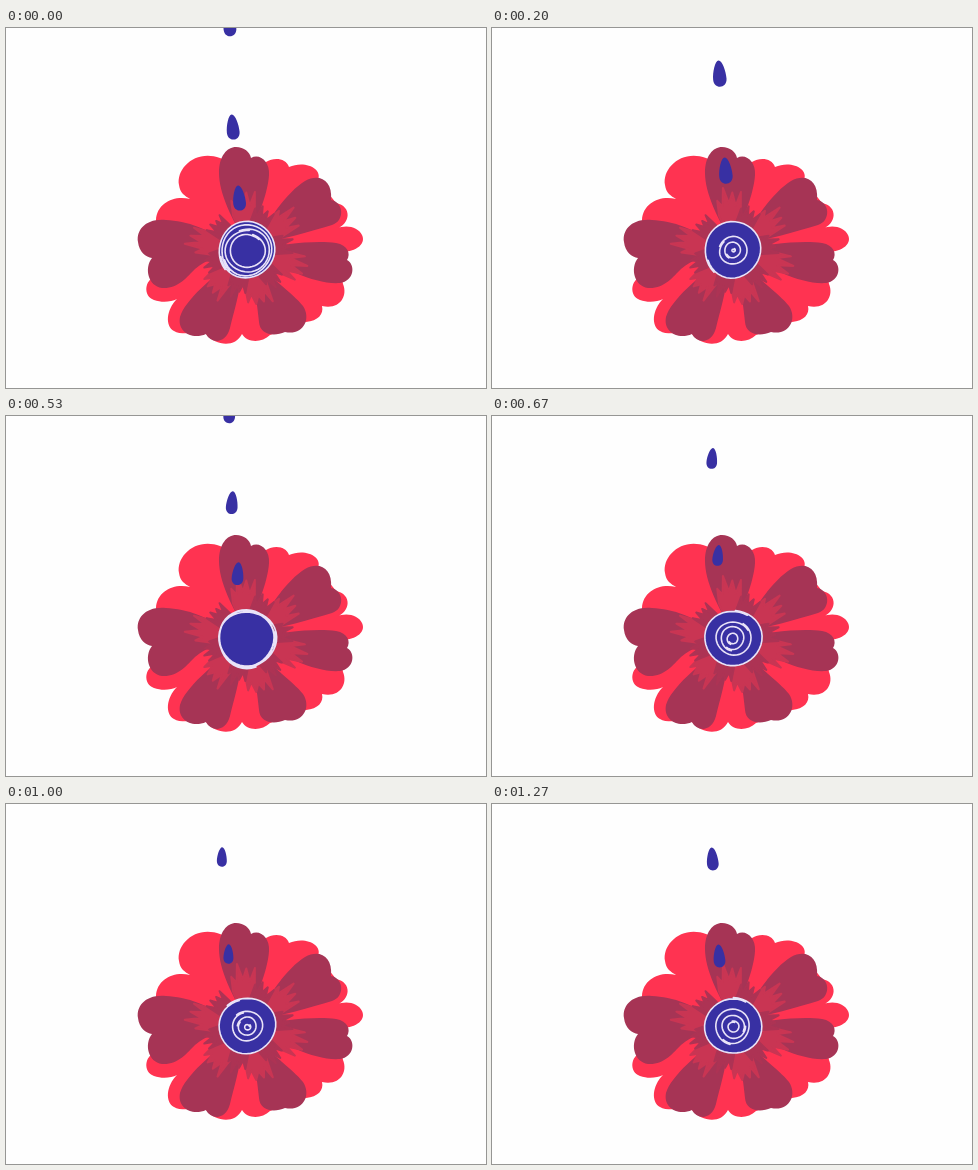
These frames come from a looping animation (480x360 px, 1.34 s). An HTML page:

```html
<!DOCTYPE html>
<html lang="en">
<head>
<meta charset="utf-8">
<title>Flower and drops</title>
<style>
  html, body { margin: 0; width: 100%; height: 100%; overflow: hidden; background: #fefefe; }
  svg { display: block; width: 100vw; height: 100vh; }
  .light { fill: #ff3351; }
  .dark { fill: #a63455; }
  #fans { stroke-width: 2; stroke-linejoin: round; }
  .ink { fill: #3830a3; }
  #rings { fill: none; stroke: #e9e3f8; stroke-width: 1.6; stroke-linecap: round; }
</style>
</head>
<body>
<svg viewBox="0 0 480 360">
  <path class="light" d="M214 130C190 121 170 140 173 157C174 165 179 168 184 171C168 167 151 175 150 192L150 248
    C138 252 137 268 148 272C156 275 165 274 171 271C160 282 159 298 168 303C174 307 184 304 200 306
    C210 318 229 320 236 306C241 315 256 315 264 307L300 294C312 293 318 286 316 278C334 282 342 268 337 256L330 224
    C352 225 360 215 356 207C352 199 340 196 330 201C345 196 346 178 330 175L312 152
    C317 140 298 132 283 139C280 130 268 129 260 134L240 140Z"/>
  <g class="dark">
    <path d="M240 214C226 192 213 165 213 145C213 128 221 119 230 119C238 119 244 124 245 130C254 125 264 134 263 147C262 166 250 195 240 214Z"/>
    <path d="M248 217C262 192 281 164 299 153C313 145 327 152 325 172C338 174 339 193 326 197C305 203 275 212 248 217Z"/>
    <path d="M250 222C275 216 310 212 330 215C342 217 345 226 341 232C350 237 348 253 334 255C310 257 275 240 250 222Z"/>
    <path d="M246 228C258 245 288 266 297 278C306 292 296 308 279 304C268 309 254 307 253 294C250 265 246 245 246 228Z"/>
    <path d="M232 230C208 247 178 273 174 289C171 304 186 312 200 306C205 316 220 316 224 300C229 280 238 250 236 232Z"/>
    <path d="M225 221C205 200 180 193 160 192C140 190 130 202 132 214C133 224 140 229 146 230C138 240 142 258 156 260C172 261 181 249 189 241C200 232 212 228 225 224Z"/>
  </g>
  <g id="fans"></g>
  <path id="core" class="ink"/>
  <g id="drops" class="ink"></g>
  <path id="rings"/>
</svg>
<script>
const CX = 241, CY = 222, HOLD = 134, POSES = 10, TAU = Math.PI * 2;
const $ = id => document.getElementById(id);
const rand = n => { const v = Math.sin(n * 12.9898 + 4.1) * 43758.5453; return v - Math.floor(v); };
const wave = (pose, peak) => Math.cos((pose - peak) / POSES * TAU);

function add(parent, d, color) {
  const p = document.createElementNS('http://www.w3.org/2000/svg', 'path');
  p.setAttribute('d', d);
  if (color) {
    p.setAttribute('fill', color);
    p.setAttribute('stroke', color);
  }
  parent.append(p);
  return p;
}

// Brush streaks spreading from the middle.
function fan(angle, reach, color, seed) {
  const n = 8;
  let d = `M${CX} ${CY}`;
  for (let i = 0; i <= n; i++) {
    const u = i / n * 2 - 1;
    const a = (angle + u * 17) / 360 * TAU;
    const r = reach * (1 - 0.2 * u * u) * (i % 2 ? 0.9 + 0.2 * rand(seed + i) : 0.78);
    d += `L${CX + r * Math.cos(a)} ${CY + r * Math.sin(a)}`;
  }
  add($('fans'), d + 'Z', color);
}
for (let i = 0; i < 6; i++) fan(i * 57 - 95, 60, '#c93553', i * 31);
for (let i = 0; i < 6; i++) fan(i * 57 - 66, 47, '#ad3354', 400 + i * 17);

// A drop enters on every even pose and falls through these heights.
const FALL = [-4, 47, 95, 144, 166];
const DROP = 'M0-13C3.5-13 6.5-2 6.5 5C6.5 15-6.5 15-6.5 5C-6.5-2-3.5-13 0-13Z';
const drops = [0, 1, 2].map(() => add($('drops'), DROP));

function drawDrops(pose) {
  const size = 0.9 + 0.14 * wave(pose, 1.5);
  drops.forEach((drop, i) => {
    const age = i * 2 + pose % 2;
    drop.style.display = age < FALL.length ? '' : 'none';
    if (age >= FALL.length) return;
    const y = FALL[age] + (age ? 9 * wave(pose, 8.3) : 0);
    const x = 221.5 + 6.5 * wave(pose, 2) + y * y / 3000;
    drop.setAttribute('transform', `translate(${x} ${y}) rotate(${5 * wave(pose, 5)}) scale(${size})`);
  });
}

// Hand-drawn loop; with some overlap its ends do not quite meet.
function loop(x, y, r, seed, wobble, overlap) {
  const p = rand(seed) * TAU, q = rand(seed + 1) * TAU;
  let d = '';
  for (let i = 0; i <= 40 + overlap; i++) {
    const t = i / 40 * TAU;
    const drift = overlap ? 0.8 - i / 34 : 0;
    const s = Math.max(0.6, r * (1 + wobble * (Math.sin(2 * t + p) + 0.6 * Math.sin(3 * t + q))) + drift);
    d += `${i ? 'L' : 'M'}${x + s * Math.cos(t + p)} ${y + s * Math.sin(t + p)}`;
  }
  return d;
}

// Poses at which a landing drop starts three ripples.
const LANDINGS = [0.9, 4.6, 6.8, 8.6];

function drawRings(pose) {
  const seed = pose * 13;
  const rim = loop(CX, CY, 28, seed, 0.018, 0);
  $('core').setAttribute('d', rim + 'Z');
  const age = Math.min(...LANDINGS.map(p => (pose - p + POSES) % POSES));
  let d = loop(CX, CY, 27.8, seed, 0.022, 3);
  for (let i = 0; i < 3; i++) {
    const r = 28 * Math.sin(Math.min((age + i / 2) * 0.46, TAU / 4));
    const s = seed + i * 5 + 3;
    d += loop(CX - 0.5 + rand(s), CY + rand(s + 1), r, s, 0.025, 3);
  }
  $('rings').setAttribute('d', d);
}

let last = -1;
function tick() {
  const pose = Math.floor((performance.now() + 6) / HOLD) % POSES;
  if (pose !== last) {
    last = pose;
    drawDrops(pose);
    drawRings(pose);
  }
  requestAnimationFrame(tick);
}
tick();
</script>
</body>
</html>
```
